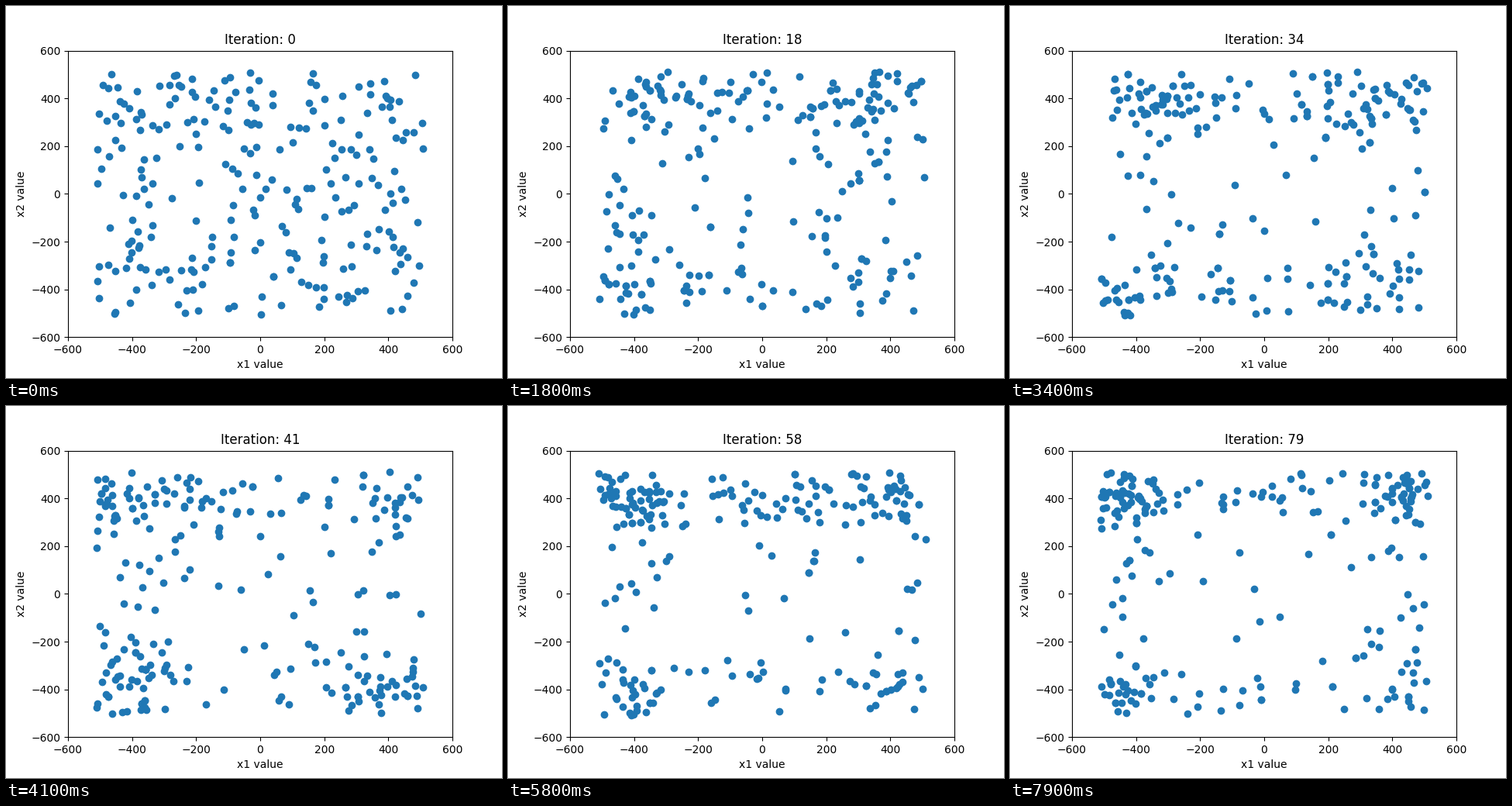
Recreate the animation shown at these times as a matplotlib script. Size 640 by 480 pixels, loop 8 s.

```python
import numpy as np
import matplotlib.pyplot as plt
from matplotlib.animation import FuncAnimation

GENERATIONS = 80
SIZE = 250
BOUND = 511

rng = np.random.default_rng(12)


def fold(v):
    """Reflect values that leave the search range."""
    v = np.where(v > BOUND, 2 * BOUND - v, v)
    return np.where(v < -BOUND, -2 * BOUND - v, v)


def draw_axis(n, spread, share, low, high):
    """Sample one coordinate: a uniform part plus a low and a high peak."""
    pick = rng.random(n)
    uniform = rng.uniform(-BOUND, BOUND, n)
    low_peak = fold(rng.normal(*low, n))
    high_peak = fold(rng.normal(*high, n))
    peak = np.where(rng.random(n) < share, low_peak, high_peak)
    return np.round(np.where(pick < spread, uniform, peak))


def offspring(n, gen):
    """Candidates whose peaks narrow as the generations pass."""
    p = gen / (GENERATIONS - 1)
    x = draw_axis(n, 0.35 + 0.65 * np.exp(-gen / 25), 0.62,
                  (-380 - 45 * p, 100 - 48 * p), (330 + 115 * p, 120 - 70 * p))
    y = draw_axis(n, 0.37 + 0.63 * np.exp(-gen / 10), 0.34 - 0.06 * p,
                  (-390, 70 - 20 * p), (385 + 20 * p, 90 - 25 * p))
    return np.column_stack([x, y])


def evolve(pop, gen):
    """Replace genes by crossover, then let a few copies survive."""
    fresh = offspring(SIZE, gen)
    kind = rng.random((SIZE, 1))
    swap = np.hstack([kind < 0.48, (kind < 0.24) | ((kind > 0.48) & (kind < 0.72))])
    pop = np.where(swap, fresh, pop)
    copies = rng.random(SIZE) < 0.08
    pop[copies] = pop[rng.integers(0, SIZE, copies.sum())]
    return pop


history = [np.round(rng.uniform(-BOUND, BOUND, (SIZE, 2)))]
for gen in range(1, GENERATIONS):
    history.append(evolve(history[-1], gen))

fig, ax = plt.subplots(figsize=(6.4, 4.8), dpi=100)
dots = ax.scatter(*history[0].T)
ax.set(xlim=(-600, 600), ylim=(-600, 600), xlabel="x1 value", ylabel="x2 value")
title = ax.set_title("Iteration: 0")


def update(i):
    dots.set_offsets(history[i])
    title.set_text(f"Iteration: {i}")
    return dots, title


anim = FuncAnimation(fig, update, frames=GENERATIONS, interval=100,
                     repeat=True, repeat_delay=0)
plt.show()
```
